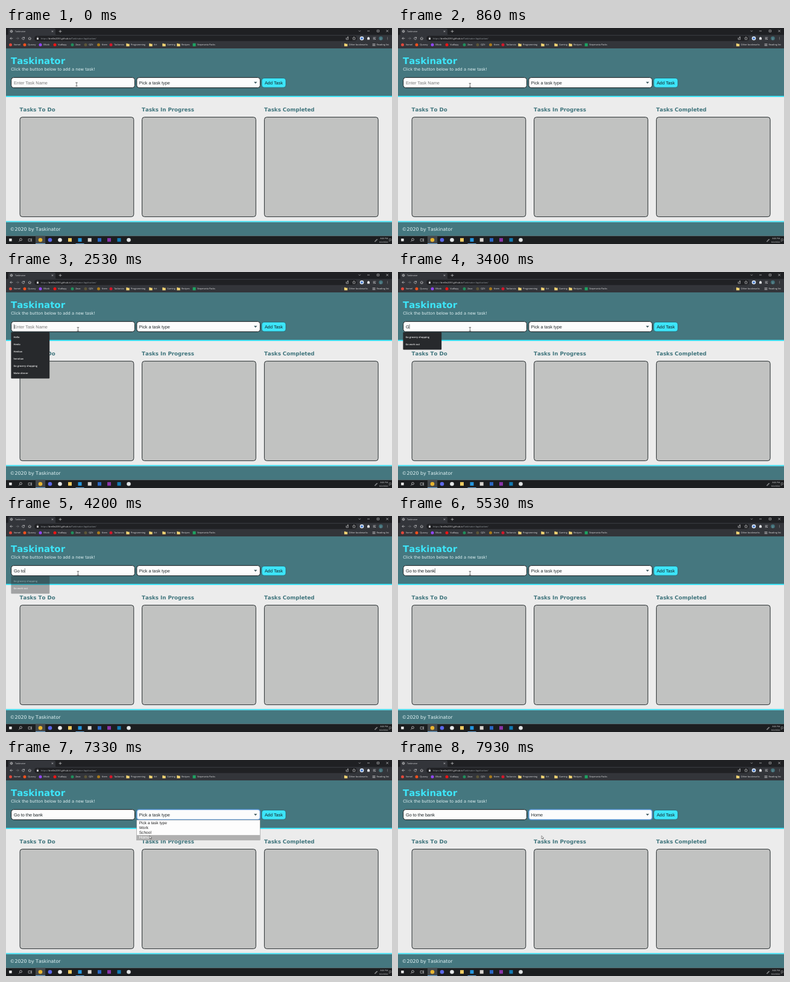
Write an HTML page that moves like this. It is 640 px wide and 360 px high and loops after 8 s.

```html
<!DOCTYPE html>
<html lang="en">
<head>
<meta charset="utf-8">
<title>Taskinator</title>
<style>
html, body { margin: 0; width: 100%; height: 100%; overflow: hidden; background: #ececec; }
svg { display: block; width: 100vw; height: 100vh; text-rendering: geometricPrecision; }
.ui { font-family: "Open Sans", sans-serif; }
.page { font-family: "DejaVu Sans", sans-serif; font-kerning: none; }
.form { font-family: "Liberation Sans", Arial, sans-serif; }
</style>
</head>
<body>
<svg id="stage" viewBox="0 0 640 360"></svg>
<script>
const LOOP = 8000;
const TEAL = '#45777f', CYAN = '#3de5f9', INK = '#151b1e', PALE = '#e2e3e5';
const stage = document.getElementById('stage');

const rect = (x, y, w, h, fill, r = 0, extra = '') =>
  `<rect x="${x}" y="${y}" width="${w}" height="${h}" rx="${r}" fill="${fill}" ${extra}/>`;
const dot = (x, y, r, fill, extra = '') => `<circle cx="${x}" cy="${y}" r="${r}" fill="${fill}" ${extra}/>`;
const line = (d, color = PALE, w = 0.6) =>
  `<path d="${d}" fill="none" stroke="${color}" stroke-width="${w}" stroke-linecap="round" stroke-linejoin="round"/>`;
const text = (x, y, size, fill, str, cls, extra = '') =>
  `<text x="${x}" y="${y}" font-size="${size}" fill="${fill}" class="${cls}" ${extra}>${str}</text>`;
const ui = (x, y, str, size = 3.8, fill = PALE, extra = '') => text(x, y, size, fill, str, 'ui', extra);
const folder = x =>
  `<path d="M${x - 2.7} 25.7h2l.7.8h2.7v4h-5.4z" fill="#f3d574"/>`;

function browser() {
  const bookmarks = [
    [7.5, 'Vomel', '#e0483c'], [31, 'Quovvy', '#f4511e'], [57, 'Blivsk', '#9147ff'],
    [81, 'Vudlopy', '#f01414'], [110, 'Zavo', '#1f8f5c'], [132, 'QZX', '#5c5638'],
    [153.5, 'Krem', '#a97a1c'], [174, 'Tackorvia', '#d3182b']
  ];
  const folders = [[202, 'Programming'], [240, 'Art'], [262, 'Gaming'], [286, 'Recipes']];
  const marks = bookmarks.map(([x, name, c]) => dot(x, 28, 2.5, c) + ui(x + 5.2, 29.4, name)).join('');
  const dirs = folders.map(([x, name]) => folder(x) + ui(x + 5, 29.4, name)).join('');
  return rect(0, 0, 640, 12, '#1f2023') +
    '<path d="M2 12q2 0 2-2V3q0-2 2-2H80q2 0 2 2v7q0 2 2 2z" fill="#33353a"/>' +
    rect(0, 11.5, 640, 22.5, '#33353a') +
    dot(9, 5.6, 1.9, '#33353a', `stroke="${PALE}" stroke-width=".6"`) +
    line('M7.2 5.6h3.6M9 3.8v3.6', PALE, 0.4) +
    ui(15, 7, 'Taskinator', 3.6) +
    line('M76 4.6l2 2m0-2l-2 2M88 5.6h4M90 3.6v4') +
    line('M585 4.6l1.3 1.3 1.3-1.3M599.4 5h3.2M615.6 3.5h3v3h-3zM630.7 3.5l3 3m0-3l-3 3') +
    line('M11 17.3H7m1.7-1.8L7 17.3l1.7 1.8') +
    line('M17 17.3h4m-1.7-1.8l1.7 1.8-1.7 1.8', '#7d8084') +
    line('M30.3 16.2a2 2 0 1 0 .3 1.7m0-2.7v1.4h-1.4') +
    line('M37 17.3l2.3-2 2.3 2m-3.8-.2v2.2h3v-2.2') +
    rect(47, 13, 535, 8.7, '#202124', 4.35) +
    rect(51, 16.8, 3, 2.4, PALE, 0.4) + line('M51.7 16.8v-.7a.8.8 0 0 1 1.6 0v.7', PALE, 0.5) +
    ui(57.8, 18.6, '<tspan fill="#9aa0a6">https://</tspan>brellin2093.github.io' +
      '<tspan fill="#9aa0a6">/Taskinator-Application/</tspan>', 3.82) +
    line('M564 16.6v2.6h3.4v-2.6m-2.2.6q.2-2 2.2-2m-.9-.9l1 .9-1 .9') +
    line('M577 14.8l.8 1.7 1.8.2-1.3 1.3.3 1.8-1.6-.9-1.6.9.3-1.8-1.3-1.3 1.8-.2z', PALE, 0.5) +
    dot(590, 17.3, 3.3, '#e3edf9') + dot(590, 17.3, 1.9, '#4c7fd0') +
    rect(599, 15.8, 4, 3.6, PALE, 0.5) + dot(601, 15.6, 0.9, PALE) +
    line('M609 15.8h4M609 17.3h2.4M609 18.8h2.4') + dot(612.4, 18.6, 0.7, PALE) +
    dot(621.5, 17.3, 3.3, '#43717a') + ui(621.5, 18.6, 'J', 3.6, PALE, 'text-anchor="middle"') +
    [15.7, 17.3, 18.9].map(y => dot(632.5, y, 0.45, PALE)).join('') +
    marks + dirs +
    rect(309.6, 25.5, 5, 5, '#1da462') + ui(317, 29.4, 'Stepmania Packs') +
    line('M557 25.5v5', '#55575b', 0.5) + folder(563.5) + ui(568.5, 29.4, 'Other bookmarks') +
    line('M608 26.5h4M608 28h4M608 29.5h4') + ui(614.5, 29.4, 'Reading list');
}

function page() {
  const columns = [[22.9, 'Tasks To Do'], [225.4, 'Tasks In Progress'], [428.2, 'Tasks Completed']];
  return rect(0, 34, 640, 80, TEAL) + rect(0, 113.1, 640, 2, CYAN) +
    rect(0, 115.1, 640, 207, '#ececec') +
    rect(0, 321.7, 640, 2, CYAN) + rect(0, 323.7, 640, 23, TEAL) +
    text(8, 59.5, 15, CYAN, 'Taskinator', 'page', 'font-weight="700"') +
    text(8.2, 71, 6.7, '#e2f3f5', 'Click the button below to add a new task!', 'page') +
    text(6.6, 338.2, 7.87, '#e2f3f5', '©2020 by Taskinator', 'page') +
    columns.map(([x, name]) =>
      text(x - 0.3, 139.2, 8.7, '#3f747c', name, 'page', 'font-weight="700"') +
      rect(x + 0.2, 148.6, 188.7, 166, '#c1c2c1', 4, `stroke="${INK}" stroke-width=".9"`)).join('') +
    rect(8.7, 82.6, 204.8, 17, '#fcfcfc', 4, `stroke="${INK}" stroke-width="1"`) +
    rect(216.8, 82.6, 204.6, 17, '#fcfcfc', 4, `id="select" stroke="${INK}" stroke-width="1"`) +
    '<path d="M411 89.7h5.4l-2.7 3z" fill="#3f5a60"/>' +
    rect(424, 83.5, 40, 15.7, CYAN, 4, 'stroke="#24545d" stroke-width=".7"') +
    text(429, 93.7, 7.3, INK, 'Add Task', 'form');
}

function taskbar() {
  const apps = [
    [57, 'c', '#e8b52f'], [73, 'c', '#5b68ea'], [89.5, 'c', '#e6e9ea'], [106, 's', '#f1cc62'],
    [122.5, 's', '#2497e0'], [138.7, 's', '#d8d4d0'], [155, 's', '#2b67c4'], [171, 's', '#8a34a8'],
    [187.5, 's', '#127ab2'], [203.5, 'c', '#dfe2e3']
  ];
  return rect(0, 346.6, 640, 13.4, '#1c1e20') + rect(49, 346.6, 16.2, 13.4, '#44484b') +
    rect(5.2, 351, 4.4, 4.4, '#f3f3f3') +
    dot(24.5, 352.6, 1.9, 'none', `stroke="${PALE}" stroke-width=".7"`) + line('M23.1 354.1l-1.7 1.8') +
    line('M37.5 351.5h3.7v3.7h-3.7zM42.5 351v4.8') +
    apps.map(([x, kind, c]) => kind === 'c' ? dot(x, 353.2, 3.3, c) : rect(x - 3, 350.2, 6, 6, c)).join('') +
    rect(49, 359.1, 16.2, 0.9, '#76b9ed') + rect(115.5, 359.1, 14, 0.9, '#76b9ed') +
    line('M611.7 355.4l3.2-3.5.8.7-3.2 3.4z') +
    ui(633.5, 352.4, '8:06 PM', 3.5, PALE, 'text-anchor="end"') +
    ui(633.5, 358, '6/2/2022', 3.5, PALE, 'text-anchor="end"') +
    line('M635.7 351.5h2.6v3h-1.6l-1 1z', PALE, 0.4);
}

stage.innerHTML = page() + browser() + taskbar() +
  text(13, 93.7, 7.3, INK, '', 'form', 'id="task"') +
  rect(13, 87.2, 0.6, 7.6, INK, 0, 'id="caret"') +
  text(220.7, 93.7, 7.3, '#20282b', '', 'form', 'id="choice"') +
  '<g id="hints"></g><g id="list"></g>' +
  `<g id="beam">${line('M-1.4-2.9h2.8M-1.4 2.9h2.8M0-2.9v5.8', '#222', 0.6)}</g>` +
  '<path id="arrow" d="M0 0v5.2l1.3-1.1.8 1.9.9-.4-.8-1.8h1.6z" fill="#fff" stroke="#111" stroke-width=".45"/>';

const el = id => document.getElementById(id);
const show = (node, on) => node.setAttribute('visibility', on ? 'visible' : 'hidden');
const put = (node, html) => { if (node.dataset.html !== html) { node.innerHTML = html; node.dataset.html = html; } };
const clamp = v => Math.max(0, Math.min(1, v));
const ease = v => v * v * (3 - 2 * v);

const TASK = 'Go to the bank';
const KEYS = [3250, 3500, 3700, 3960, 4120, 4320, 4450, 4550, 4650, 4790, 4950, 5060, 5170, 5290];
const HISTORY = ['Hello', 'Henlo', 'Henlow', 'hennlow', 'Go grocery shopping', 'Make dinner'];
const MATCHES = ['Go grocery shopping', 'Go work out'];
const OPTIONS = ['Pick a task type', 'Work', 'School', 'Home'];
const FOCUS = 1100, LEAVE = 6420, OPEN = 6420, PICK = 7450;

// time, x, y
const PATH = [[0, 117, 94], [300, 117, 94], [900, 119.4, 95.2], [5650, 119.4, 95.2],
  [6300, 232.3, 93.6], [6800, 232.3, 93.6], [7350, 238, 126.2], [LOOP, 238, 126.2]];

function pointer(t) {
  const i = PATH.findIndex((p, k) => k && t <= p[0]);
  const a = PATH[i - 1], b = PATH[i], k = ease((t - a[0]) / (b[0] - a[0]));
  return [a[1] + (b[1] - a[1]) * k, a[2] + (b[2] - a[2]) * k];
}

function hints(items) {
  return rect(8.4, 100.2, 63.8, 5.4 + items.length * 12, '#27292c', 1) +
    items.map((s, i) => ui(12.4, 110.4 + i * 12, s, 4, '#f1f1f1', 'font-weight="600"')).join('');
}

function options(y) {
  const hot = Math.max(0, Math.min(3, Math.floor((y - 100) / 8.3)));
  return rect(216.6, 100, 204.6, 33.6, '#fdfdfd', 0, 'stroke="#777" stroke-width=".5"') +
    rect(216.9, 100.2 + hot * 8.3, 204, 8.3, '#b0b0b0') +
    OPTIONS.map((s, i) => text(220.7, 106.5 + i * 8.3, 6.6, i === hot ? '#fff' : '#222', s, 'form')).join('');
}

function draw(t) {
  const typed = KEYS.filter(k => k <= t).length;
  const focused = t >= FOCUS && t < LEAVE;
  const task = el('task'), caret = el('caret');
  put(task, typed ? TASK.slice(0, typed).replace(/ $/, '\u00a0') : 'Enter Task Name');
  task.setAttribute('fill', typed ? INK : '#757575');
  caret.setAttribute('x', 13 + (typed ? task.getComputedTextLength() : 0));
  const since = t - Math.max(FOCUS, ...KEYS.filter(k => k <= t));
  show(caret, focused && since % 1000 < 500);

  put(el('hints'), hints(typed ? MATCHES : HISTORY));
  el('hints').setAttribute('opacity', 1 - clamp((t - 4100) / 160));
  show(el('hints'), t >= FOCUS && t < 4260);

  const [x, y] = pointer(t);
  const open = t >= OPEN && t < PICK;
  put(el('list'), options(y));
  show(el('list'), open);
  put(el('choice'), t < PICK ? OPTIONS[0] : OPTIONS[3]);
  el('select').setAttribute('stroke', t >= OPEN ? '#4f8fd0' : INK);
  el('select').setAttribute('stroke-width', t >= OPEN ? 1.5 : 1);

  const inField = x < 213.5;
  for (const id of ['beam', 'arrow']) {
    el(id).setAttribute('transform', `translate(${x} ${y})`);
    show(el(id), (id === 'beam') === inField);
  }
}

function tick() {
  draw(performance.now() % LOOP);
  requestAnimationFrame(tick);
}
tick();
</script>
</body>
</html>
```
